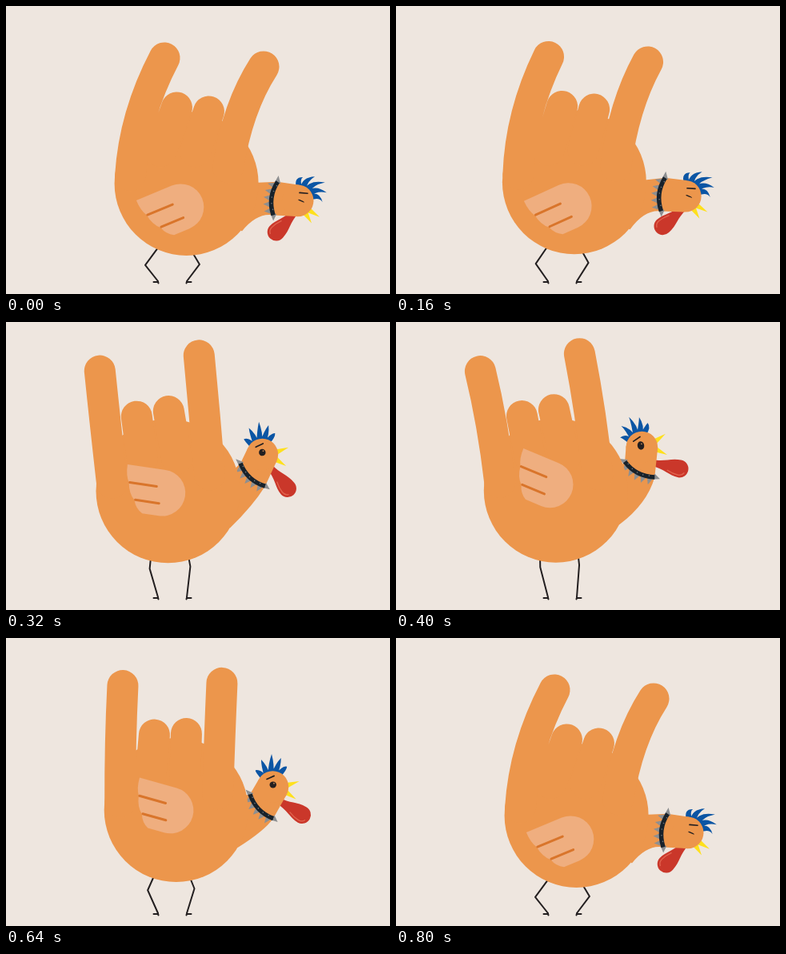
Animation, 480 px wide and 360 px high, one loop 0.84 s. Source, as an HTML page:

```html
<!DOCTYPE html>
<html lang="en">
<head>
<meta charset="utf-8">
<title>Rocking hand bird</title>
<style>
  html, body { margin: 0; width: 100%; height: 100%; overflow: hidden; background: #eee6df; }
  svg { display: block; width: 100vw; height: 100vh; }
</style>
</head>
<body>
<svg viewBox="0 0 480 360" fill="none" stroke-linecap="round" stroke-linejoin="round">
  <rect width="480" height="360" fill="#eee6df"/>
  <g stroke="#231f20" stroke-width="2">
    <path id="legs"/>
    <path d="M190 345H184.5M190 344.5L190.5 346.5M226 345H231.5M226 344.5L225.5 346.5"/>
  </g>
  <g id="wattle">
    <path d="M-7-4C8-4 15-11 28-11A11 11 0 0 1 29 11C17 11 10 4-7 4Z" fill="#ca372a"/>
    <path d="M14 5C19 7 22 8 28 8Q33 8 35 4" stroke="#e2644f" stroke-width="1.3"/>
  </g>
  <g id="plume">
    <path id="crest" fill="#0b55a4"/>
    <path id="beak" fill="#fee01c"/>
  </g>
  <path id="neck" fill="#ec964c"/>
  <circle id="skull" r="19.8" fill="#ec964c"/>
  <g id="collar">
    <path id="spikes" fill="#8d8f91"/>
    <path d="M0-21Q-10 0 0 21" stroke="#18222b" stroke-width="5.5" stroke-linecap="butt"/>
    <path d="M-.5-16Q-9 0-.5 16" stroke="#6f777d" stroke-width="1.6" stroke-dasharray="0 7.8"/>
  </g>
  <g id="face">
    <path id="brow" d="M-5 0H5" stroke="#231f20" stroke-width="1.7"/>
    <g id="eye">
      <ellipse id="ball" rx="4.2" fill="#231f20"/>
      <circle id="glint" cx="1.2" cy="-1.8" r=".9" fill="#c98a55"/>
    </g>
  </g>
  <circle id="palm" r="90" fill="#ec964c"/>
  <path id="fingers" stroke="#ec964c" stroke-width="39"/>
  <g id="wing">
    <path d="M-48-29H0A29 29 0 0 1 0 29H-21Q-30 24-33 14Q-41 7-43-7Q-48-15-48-29Z" fill="#efae7f"/>
    <path d="M-42-7H-8M-32 13.5H-2" stroke="#d9752b" stroke-width="3"/>
  </g>
</svg>
<script>
const STEP = 40, LOOP = 840, HALF = 400, RAD = Math.PI / 180;
const $ = {};
document.querySelectorAll('[id]').forEach(el => $[el.id] = el);

const mix = (a, b, k) => a + (b - a) * k;
const mix2 = (a, b, k) => [mix(a[0], b[0], k), mix(a[1], b[1], k)];
const add = (a, b) => [a[0] + b[0], a[1] + b[1]];
const polar = (r, deg) => [r * Math.cos(deg * RAD), r * Math.sin(deg * RAD)];
const pt = p => p[0].toFixed(2) + ' ' + p[1].toFixed(2);
const set = (el, name, value) => el.setAttribute(name, value);
const place = (el, p, deg = 0) =>
  set(el, 'transform', `translate(${pt(p)}) rotate(${deg.toFixed(2)})`);

// 0 = crouched, 1 = upright; "start" is when the crouch is deepest
function swing(time, start) {
  let u = ((time - start) / HALF + 4) % 2;
  if (u > 1) u = 2 - u;
  return u < 0.5 ? 4 * u ** 3 : 1 - 4 * (1 - u) ** 3;
}

function finger(c, base, tip, bow) {
  const ctl = [(base[0] + tip[0]) / 2 + bow, base[1] - 75];
  return `M${pt(add(c, base))}Q${pt(add(c, ctl))} ${pt(add(c, tip))}`;
}

function stub(c, base, tip) {
  return `M${pt(add(c, base))}L${pt(add(c, tip))}`;
}

function feathers(k) {
  const tips = [[-95, 30], [-72, 37], [-51, 41], [-33, 37.5], [-14, 31]];
  const curl = mix(16, -7, k);
  return tips.map(([angle, r], i) => {
    const root = -90 + i * 17;
    const deg = angle + mix(10, 0, k);
    const mid = (root + deg) / 2 - curl;
    return `M${pt(polar(16, root - 13))}Q${pt(polar(30, mid - 5))} ${pt(polar(r, deg))}` +
      `Q${pt(polar(27, mid + 10))} ${pt(polar(16, root + 13))}Z`;
  }).join('');
}

function beakHalf(root, deg, r) {
  return `M${pt(polar(17, root - 13))}L${pt(polar(r, deg))}L${pt(polar(17, root + 13))}Z`;
}

function spikes() {
  let d = 'M-4-19L0-29L4-19ZM-4 19L1 28L4 19Z';
  for (let i = 0; i < 5; i++) {
    const y = -16 + i * 8;
    const x = -5 * (1 - (y / 21) ** 2) - 2;
    d += `M${x} ${y - 3.5}L${x - 8} ${y * 1.1}L${x} ${y + 3.5}Z`;
  }
  return d;
}

function draw(time) {
  const lead = swing(time, 30), body = swing(time, 40), hand = swing(time, 52);
  const turn = swing(time, 75), drag = swing(time, 95);
  const arch = k => k * (1 - k);

  const c = add(mix2([225.7, 222], [199.7, 210.6], body), [0, -5 * arch(body)]);
  place($.palm, c);
  const knees = [mix2([174, 324], [180.3, 306.5], body), mix2([242, 323], [229, 303.5], body)];
  const hips = [mix2([191, 301], [180, 292], body), mix2([230, 303], [227.5, 290], body)];
  set($.legs, 'd', `M${pt(hips[0])}L${pt(knees[0])}L190 344M${pt(hips[1])}L${pt(knees[1])}L226 344`);

  const rise = -8 * arch(lead);
  set($.fingers, 'd',
    finger(c, [-70, -10], [mix(-27, -95, hand), mix(-157, -149, lead) + rise], mix(-17, 4, turn)) +
    finger(c, [52, -20], [mix(97, 29, hand), mix(-146, -171, lead) + rise], mix(-11, 4, turn)) +
    stub(c, [-32, -40], mix2([-12, -95], [-42.5, -93], body)) +
    stub(c, [11, -40], mix2([28, -90], [-2.5, -101], body)));

  place($.wing, add(c, [-7.3, mix(31, -9, swing(time, 85))]), mix(-25.3, 25.3, drag));

  // neck, collar and head
  const mid = mix2([337, 241], [304.5, 184], swing(time, 45));
  const tilt = mix(9.5, -64.5, turn), lean = mix(8, -87, turn);
  const head = add(mid, polar(28, lean));
  const top = add(mid, polar(21, tilt - 90)), low = add(mid, polar(21, tilt + 90));
  const join = add(c, mix2([69, 60], [80, 42], turn));
  const ctl = add(c, [mix(87, 116, drag), mix(36, 16, body)]);
  set($.neck, 'd', `M${pt(add(c, mix2([70, 0], [70, -20], turn)))}L${pt(top)}` +
    `L${pt(add(head, polar(19.8, lean - 90)))}L${pt(add(head, polar(19.8, lean + 90)))}` +
    `L${pt(low)}Q${pt(ctl)} ${pt(join)}L${pt(c)}Z`);
  place($.skull, head);
  place($.collar, mid, tilt);
  place($.plume, head, tilt);
  place($.face, head, tilt);

  set($.crest, 'd', feathers(turn));
  set($.beak, 'd', beakHalf(mix(34, 41, turn), mix(29, 33, turn), 34) +
    beakHalf(mix(50, 70, turn), mix(50, 80, turn), 33));

  place($.brow, [6, -10.4], mix(-4, 29, turn));
  place($.eye, mix2([4.5, -0.3], [1.1, -2.2], turn), mix(15, 55, turn));
  set($.ball, 'ry', mix(0.6, 5.4, turn).toFixed(2));
  set($.glint, 'opacity', turn > 0.6 ? 1 : 0);

  place($.wattle, add(head, mix2([-8, 18.5], [20, 21], turn)), mix(141, 5, drag));
}

set($.spikes, 'd', spikes());

function tick(now) {
  draw(Math.floor((now % LOOP) / STEP) * STEP);
  requestAnimationFrame(tick);
}
draw(0);
requestAnimationFrame(tick);
</script>
</body>
</html>
```
